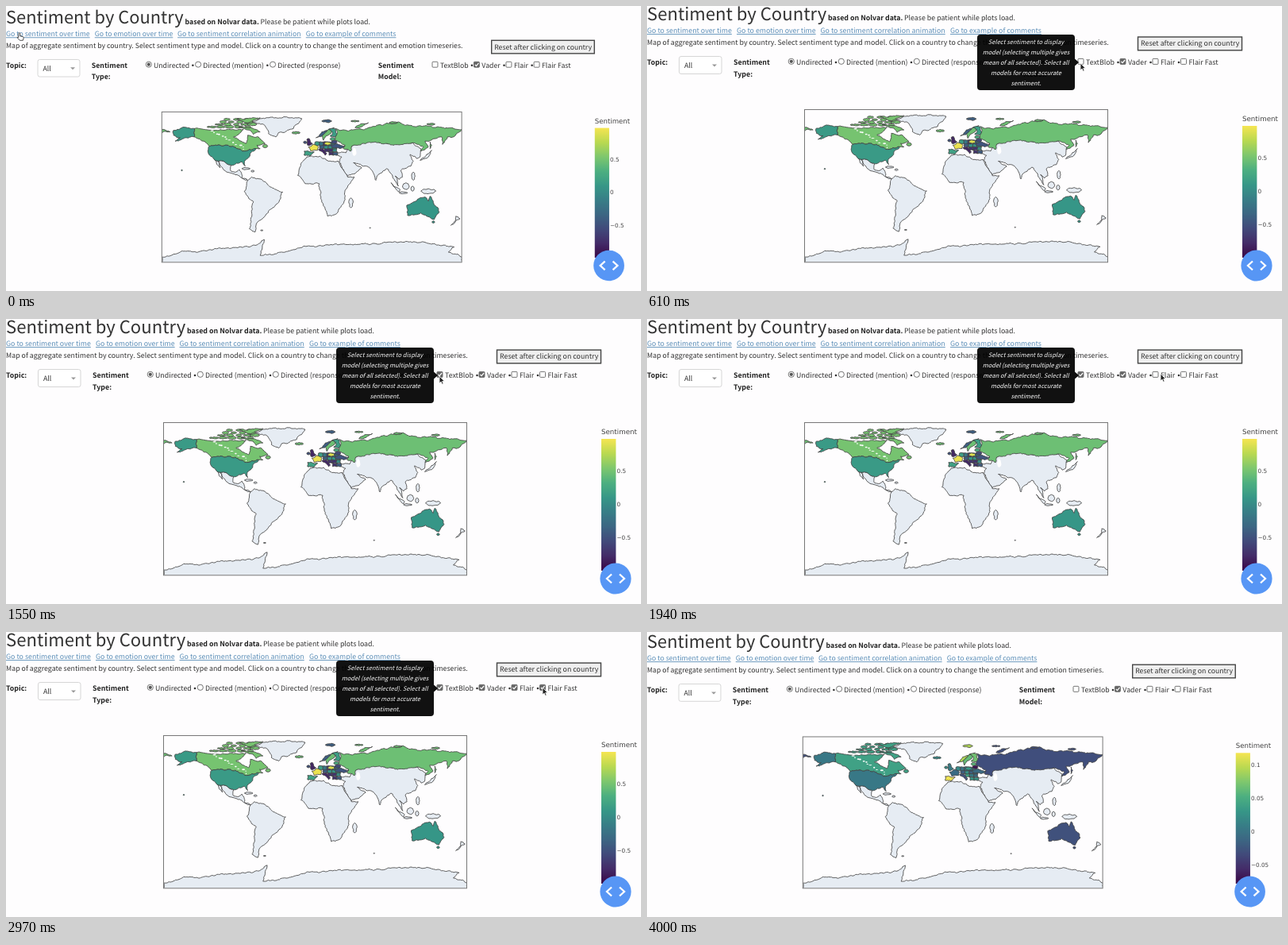
Write an HTML page that moves like this. It is 800 px wide and 359 px high and loops after 4.03 s.

```html
<!DOCTYPE html>
<html lang="en">
<head>
<meta charset="utf-8">
<title>Sentiment by Country</title>
<style>
html, body { margin: 0; width: 100%; height: 100%; overflow: hidden; background: #fefdfe; }
svg { display: block; width: 100vw; height: 100vh; }
text {
  font: 8.83px "Noto Sans CJK SC", "Noto Sans CJK JP", "Noto Sans", sans-serif;
  fill: #333; text-rendering: geometricPrecision; white-space: pre;
}
text.title { font-size: 22.1px; }
text.bold { font-weight: 700; fill: #222; }
text.link { fill: #5c8fb8; text-decoration: underline; text-decoration-thickness: .7px; }
text.tip { font-size: 7.57px; font-style: italic; fill: #fff; text-anchor: middle; }
text.plot { font: 8.7px "DejaVu Sans", sans-serif; fill: #444; }
text.tick { font: 7.3px "DejaVu Sans", sans-serif; fill: #444; }
.faded { filter: saturate(.76); }
#map path { stroke: #444; stroke-width: .85; stroke-linejoin: round; vector-effect: non-scaling-stroke; fill: var(--a); }
.late #map path { fill: var(--b); }
#map path.water { stroke: none; fill: #fff; }
</style>
</head>
<body>
<svg id="stage" viewBox="0 0 800 359">
  <defs>
    <linearGradient id="scale" x1="0" y1="1" x2="0" y2="0"></linearGradient>
    <clipPath id="frame"><rect x="198.5" y="130.5" width="382" height="192"/></clipPath>
  </defs>
  <g id="page">
    <g id="text"></g>
    <g clip-path="url(#frame)" class="faded"><g id="map" transform="matrix(1.061 0 0 -1.067 389.5 226.5)"></g></g>
    <rect x="198.5" y="130.5" width="382" height="192.3" fill="none" stroke="#777"/>
    <rect class="faded" x="750" y="151" width="18.4" height="166" fill="url(#scale)"/>
    <g id="ticks"></g>
    <circle cx="768" cy="327" r="19.6" fill="#5796f5"/>
    <path d="M763 321.5l-6 5.5 6 5.5M773 321.5l6 5.5-6 5.5" fill="none" stroke="#fff" stroke-width="2.3"/>
    <g id="tip">
      <path d="M420 36H535q4 0 4 4V66.500l5 4.500-5 4.500V102q0 4-4 4H420q-4 0-4-4V40q0-4 4-4z"/>
    </g>
    <g id="cursor" stroke-linejoin="round">
      <path id="arrow" d="M0 0V9l2.100-1.900 1.400 3.200 1.600-.7-1.400-3.100H6.400z" fill="#222" stroke="#fff" stroke-width=".8"/>
      <path id="hand" d="M1 1q1-1.500 2 0V4.500l3.600.8q1 .4.8 1.700L6.600 10H2.600L-.6 6.600q-.2-1 .9-.7L1 6.300z" fill="#fff" stroke="#222" stroke-width=".8"/>
    </g>
  </g>
</svg>
<script>
const LOOP = 4030;
const $ = id => document.getElementById(id);

function add(parent, tag, attrs, content) {
  const el = document.createElementNS('http://www.w3.org/2000/svg', tag);
  for (const key in attrs) el.setAttribute(key, attrs[key]);
  if (content) el.textContent = content;
  return parent.appendChild(el);
}
const label = (x, y, s, cls = '', parent = $('text')) => add(parent, 'text', { x, y, class: cls }, s);

let seed = 7;
const rand = () => (seed = seed * 16807 % 2147483647) / 2147483647;

// Colour scale
const VIRIDIS = ['440154', '482878', '3e4989', '31688e', '26828e', '1f9e89', '35b779', '6ece58', 'b5de2b', 'fde725'];
function shade(v) {
  const p = v * 9, i = Math.min(8, Math.floor(p));
  const part = (hex, k) => parseInt(hex.substr(k * 2, 2), 16);
  return 'rgb(' + [0, 1, 2].map(k => {
    const a = part(VIRIDIS[i], k), b = part(VIRIDIS[i + 1], k);
    return Math.round(a + (b - a) * (p - i));
  }) + ')';
}
VIRIDIS.forEach((c, i) => add($('scale'), 'stop', { offset: i / 9, 'stop-color': '#' + c }));

// Breaks a line into a ragged coast; both directions give the same line, so neighbours fit
function ragged(a, b) {
  const len = Math.hypot(b[0] - a[0], b[1] - a[1]);
  if (len < 2.5) return [b];
  const x = (a[0] + b[0]) / 2, y = (a[1] + b[1]) / 2, r = Math.min(len * .14, .8);
  const mid = [x + r * Math.sin(7 * x + 5 * y), y + r * Math.cos(5 * x - 9 * y)];
  return [...ragged(a, mid), ...ragged(mid, b)];
}
function coast(points) {
  const line = points.flatMap((p, i) => ragged(p, points[(i + 1) % points.length]));
  return 'M' + line.map(p => p.map(v => v.toFixed(2)).join(' ')).join('L') + 'z';
}
// Outlines are key points in degrees: "lon lat lon lat ..."
function pairs(outline) {
  const n = outline.split(' ').map(Number);
  return n.filter((_, i) => i % 2 === 0).map((lon, i) => [lon, n[2 * i + 1]]);
}
const blob = (lon, lat, w, h) => [...Array(8).keys()].map(i =>
  [lon + w * Math.cos(i * Math.PI / 4), lat + h * Math.sin(i * Math.PI / 4)]);
const region = (points, a, b, cls = '') =>
  add($('map'), 'path', { d: coast(points), class: cls, style: `--a:${a};--b:${b}` });

const LAND = '#e5ecf6';
const land = outline => region(pairs(outline), LAND, LAND);
const island = (...at) => region(blob(...at), LAND, LAND);
const lake = (...at) => region(blob(...at), '', '', 'water');
// Two values per country: before and after the update
const tint = (points, v, w) => region(points, shade(v), shade(w));
const country = (v, w, outline) => tint(pairs(outline), v, w);

land('-73 78 -60 82 -30 84 -12 82 -20 74 -22 70 -40 65 -43 60 -52 64 -54 70 -58 75');
land('-117 33 -106 31 -97 26 -97 19 -91 18 -87 21 -84 15 -83 10 -77 8 -86 12 -95 16 -105 20 -113 31 -110 23');
land('-77 8 -72 12 -60 9 -50 0 -35 -6 -39 -17 -48 -26 -57 -36 -65 -42 -68 -54 -75 -50 -70 -18 -81 -5');
land('-6 36 10 37 20 31 32 31 43 12 51 12 40 -4 40 -15 35 -24 28 -33 19 -35 12 -18 9 4 -8 4 -17 14 -13 28');
land('27 40 36 36 33 30 43 13 52 16 60 23 50 29 68 24 72 20 77 8 80 15 90 22 95 16 99 9 104 1 100 13 105 9 109 12 107 20 119 25 122 31 118 39 126 34 130 36 131 46 121 53 98 52 76 55 60 54 46 48 41 41');
land('-180 -95 -180 -84 -158 -78 -100 -73 -68 -70 -57 -63 -62 -82 -36 -78 -10 -71 33 -69 70 -69 95 -66 135 -66 171 -72 164 -78 180 -84 180 -95');
land('130 32 141 41 144 44 140 36');
land('173 -35 178 -38 167 -46 173 -40');
land('95 5 106 -3 105 -6');
island(113, 1, 4, 4);
island(121, -2, 2, 3);
island(140, -5, 9, 3);
island(122, 13, 2, 5);
island(110, -7, 5, 1);
island(47, -19, 2.5, 6);
island(-79, 22, 5, 1);
island(-71, 19, 2, 1);
island(-60, -52, 1.5, .5);
island(70, -49, .7, .4);

// Canada with its northern islands
const CANADA = [.76, .6], USA = [.57, .42], RUSSIA = [.74, .24], AUSTRALIA = [.55, .25];
country(...CANADA, '-141 70 -141 60 -130 55 -123 49 -95 49 -82 43 -75 45 -67 46 -62 46 -66 50 -56 52 -64 60 -77 62 -77 57 -79 52 -88 57 -94 60 -82 69 -95 69 -115 68');
for (let lat = 72; lat < 82; lat += 3)
  for (let lon = lat * 2 - 264; lon < -72; lon += 10)
    tint(blob(lon + rand() * 4, lat, 3 + rand() * 3, .8 + rand()), ...CANADA);
country(...CANADA, '-90 82 -62 83 -78 77');
country(...CANADA, '-88 72 -73 71 -62 66 -70 63 -74 68');
tint(blob(-56, 49, 3, 2), ...CANADA);

country(...USA, '-123 49 -95 49 -82 43 -75 45 -67 46 -74 40 -76 35 -81 31 -80 25 -84 30 -97 26 -106 31 -117 33 -124 40');
country(...USA, '-141 70 -141 60 -152 59 -164 55 -158 59 -166 62 -166 68 -156 71');
tint(blob(-156, 20, .8, .6), ...USA);
// Lakes on a band from the Arctic to the east
for (let i = 0; i < 14; i++) {
  const p = i / 13;
  lake(-121 + 38 * p + rand() * 4, 66 - 21 * p + rand() * 2, .6 + rand() * 1.6, .4 + rand() * .6);
}

country(...RUSSIA, '30 70 44 67 60 69 72 72 87 75 104 78 113 74 140 73 180 69 170 60 163 60 157 51 156 60 136 55 140 48 131 43 134 48 121 53 98 50 76 54 60 52 48 49 47 43 38 46 40 50 28 56 30 63');
country(...RUSSIA, '-180 69 -170 66 -180 65');
country(...RUSSIA, '52 71 56 74 68 77 57 71');
country(...RUSSIA, '142 54 144 50 142 46');
[52, 98, 143].forEach(lon => tint(blob(lon, 81 - lon / 25, 5, 1), ...RUSSIA));
lake(51, 42, 2.5, 5);

country(...AUSTRALIA, '114 -22 115 -34 131 -31 138 -35 147 -39 153 -30 146 -19 142 -11 140 -17 136 -12 130 -13 122 -18');
tint(blob(146, -42, 1.6, 1.3), ...AUSTRALIA);

// Europe: a patchwork in the middle, then the countries that stand out
for (let lat = 38; lat < 54; lat += 4)
  for (let lon = 4 + Math.max(0, 50 - lat) * 1.4; lon < 27; lon += 5)
    tint([[lon, lat], [lon + 5, lat], [lon + 5, lat + 4], [lon, lat + 4]], rand() * .6, .3 + rand() * .35);
country(.3, .87, '5 59 12 66 27 71 20 69 12 61');
country(.74, .72, '12 61 20 69 24 66 17 61 14 56');
country(.58, .75, '20 69 29 70 30 63 28 60 22 61 25 65');
country(.1, .43, '-5 50 1 52 -3 58 -6 57');
country(.98, .36, '-4 48 2 51 8 48 7 44 -1 43');
country(.6, .99, '-9 43 3 42 -2 37 -9 38');
country(.1, .25, '8 45 13 46 18 40 16 38 11 43');
country(.26, .36, '23 49 30 52 40 49 34 46');
tint(blob(-8, 53.5, 2, 1.5), .25, .52);
tint(blob(-19, 65, 5, 1.5), .74, .5);
tint(blob(18, 79, 6, 1.4), .3, .87);
tint(blob(19, 52, 4, 2), .95, .56);
tint(blob(27, 54, 3.5, 2), .22, .04);
tint(blob(25, 57.5, 3, 1.8), .66, .7);

// Page text
label(0, 17.6, 'Sentiment by Country', 'title');
label(228, 18, 'based on Nolvar data.', 'bold');
label(324, 18, 'Please be patient while plots load.');
[[0, 'sentiment over time'], [113, 'emotion over time'], [218.5, 'sentiment correlation animation'], [382, 'example of comments']]
  .forEach(([x, s]) => label(x, 34, 'Go to ' + s, 'link'));
label(0, 49, 'Map of aggregate sentiment by country. Select sentiment type and model. Click on a country to change the sentiment and emotion timeseries.');
add($('text'), 'rect', { x: 618.5, y: 39, width: 131, height: 16.8, fill: '#efefef', stroke: '#444', 'stroke-width': 1.4 });
label(622, 50.4, 'Reset after clicking on country');
label(0, 73.8, 'Topic:', 'bold');
add($('text'), 'rect', { x: 40.5, y: 63.5, width: 53.5, height: 22, rx: 2.5, fill: '#fff', stroke: '#ccc', 'stroke-width': .8 });
label(47, 78, 'All');
add($('text'), 'path', { d: 'M82 73.6h6l-3 3z', fill: '#999' });
for (const [x, word] of [[109, 'Type:'], [474, 'Model:']]) {
  label(x, 73.8, 'Sentiment', 'bold');
  label(x, 88.8, word, 'bold');
}
const bullet = x => add($('text'), 'circle', { cx: x, cy: 71, r: 1.3, fill: '#333' });
['Undirected', 'Directed (mention)', 'Directed (response)'].forEach((s, i) => {
  const x = [188, 251, 346][i];
  const dot = (r, style) => add($('text'), 'circle', { cx: x - 6.2, cy: 69.8, r, ...style });
  label(x, 73.8, s);
  dot(3.6, { fill: '#fff', stroke: '#666', 'stroke-width': .9 });
  if (i) bullet(x - 13); else dot(2.1, { fill: '#555' });
});

// Each box is ticked from `on` until the page resets
const RESET = 3640, RECOLOR = 3300;
const boxes = [[553, 'TextBlob', 850], [606, 'Vader', 0], [647, 'Flair', 2130], [682.5, 'Flair Fast', 2640]].map(([x, s, on], i) => {
  const square = { x: x - 10, y: 66.4, width: 7, height: 7, rx: 1 };
  label(x, 73.8, s);
  if (i) bullet(x - 12.5);
  add($('text'), 'rect', { ...square, fill: '#fff', stroke: '#666', 'stroke-width': .9 });
  const mark = add($('text'), 'g');
  add(mark, 'rect', { ...square, fill: '#666' });
  add(mark, 'path', { d: `M${x - 8.6} 70l1.700 1.700 3-3.700`, fill: 'none', stroke: '#fff', 'stroke-width': 1.2 });
  return { mark, on };
});
['Select sentiment to display', 'model (selecting multiple gives', 'mean of all selected). Select all', 'models for most accurate', 'sentiment.']
  .forEach((s, i) => label(477.5, 47.6 + i * 13.1, s, 'tip', $('tip')));
label(750, 145, 'Sentiment', 'plot', $('ticks'));
const ticks = [0, 1, 2, 3].map(() => label(769.5, 0, '', 'tick', $('ticks')));

// Eased 0 to 1 between two times
function ramp(t, from, to) {
  const p = Math.max(0, Math.min(1, (t - from) / (to - from)));
  return p * p * (3 - 2 * p);
}
// Cursor glides: start, end, x, y
const GLIDES = [[60, 310, 555, 68], [340, 480, 546, 72], [1670, 1930, 647, 69], [1950, 2060, 640, 71], [2210, 2500, 676, 70], [2970, 3450, 600, 200]];
function cursorAt(t) {
  let x = 15, y = 29;
  for (const [from, to, gx, gy] of GLIDES) {
    const p = ramp(t, from, to);
    x += (gx - x) * p;
    y += (gy - y) * p;
  }
  return [x, y];
}
const show = (el, on) => el.style.display = on ? '' : 'none';

let phase;
function setPhase(late) {
  if (phase === late) return;
  phase = late;
  $('stage').classList.toggle('late', late);
  const names = late ? ['0.1', '0.05', '0', '−0.05'] : ['0.5', '0', '−0.5', ''];
  ticks.forEach((el, i) => {
    el.textContent = names[i];
    el.setAttribute('y', (late ? 169.3 : 194) + i * 42);
  });
}

function draw(now) {
  const t = now % LOOP;
  // The page zooms in at the start and out at the end, about its lower edge
  const out = 1 - ramp(t, 30, 210) + ramp(t, RESET, 4000);
  const sx = 1 - .011 * out, sy = 1 - (.015 - .0075 * t / LOOP) * out;
  $('page').setAttribute('transform', `matrix(${sx} 0 0 ${sy} 0 ${325 * (1 - sy)})`);
  $('cursor').setAttribute('transform', `translate(${cursorAt(t)})`);
  show($('cursor'), t < RESET);
  show($('hand'), t < 90);
  show($('arrow'), t >= 90);
  $('tip').setAttribute('opacity', .93 * (ramp(t, 230, 380) - ramp(t, 3060, 3200)));
  boxes.forEach(({ mark, on }) => show(mark, !on || (t >= on && t < RESET)));
  setPhase(t >= RECOLOR);
}
const start = performance.now();
function tick() {
  draw(performance.now() - start);
  requestAnimationFrame(tick);
}
tick();
</script>
</body>
</html>
```
